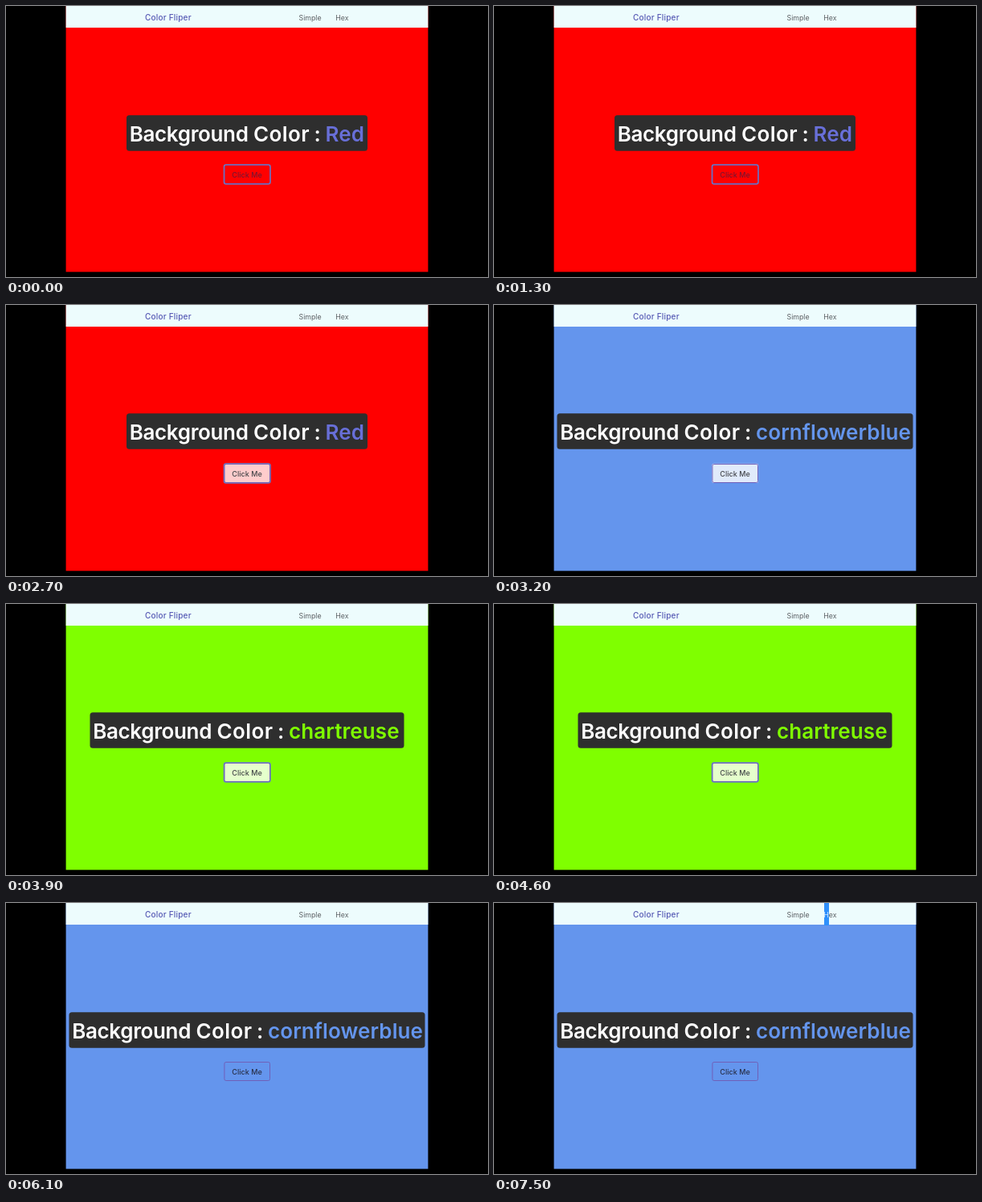
Animation of 600 by 338 pixels, one loop 8 s. Source, as an HTML page:

```html
<!DOCTYPE html>
<html lang="en">
<head>
<meta charset="utf-8">
<title>Color Fliper</title>
<style>
  html, body { margin: 0; width: 100%; height: 100%; overflow: hidden; background: #000; }
  svg { display: block; width: 100%; height: 100%; }
  text { font-family: Inter, "Open Sans", sans-serif; white-space: pre; }
  .title { font-size: 26px; font-weight: 600; fill: #fff; }
  .brand { font-size: 10px; font-weight: 500; letter-spacing: .2px; fill: #5558b4; }
  .nav { font-size: 8.8px; font-weight: 400; fill: #5c6064; }
  .label { font-size: 9px; font-weight: 500; letter-spacing: .05px; }
</style>
</head>
<body>
<svg viewBox="0 0 600 338">
  <defs>
    <clipPath id="wordClip"><rect x="281" y="204" width="24" height="13"/></clipPath>
    <clipPath id="navClip"><rect x="411" y="0" width="6" height="28"/></clipPath>
  </defs>
  <rect width="600" height="338"/>
  <rect id="page" x="74.6" y="0" width="450.8" height="331.6"/>
  <rect x="74.6" y="0" width="450.8" height="27" fill="#edfcfd"/>
  <text class="brand" x="173" y="18">Color Fliper</text>
  <text class="nav" x="364.5" y="17.6">Simple</text>
  <text class="nav" x="410.2" y="17.6">Hex</text>
  <g id="navSel">
    <rect x="411" y="0" width="6" height="28" fill="#2f90fb"/>
    <text class="nav" x="410.2" y="17.6" clip-path="url(#navClip)" style="fill:#d9ecff">Hex</text>
  </g>

  <g id="banner">
    <rect id="box" y="135.3" height="44.5" rx="3.5" fill="#2e2e2e"/>
    <g id="words">
      <text class="title" x="3.7" y="168.2" letter-spacing="-.35">Background</text>
      <text class="title" x="158" y="168.2" letter-spacing=".4">Color</text>
      <text class="title" x="233.4" y="168.2">:</text>
      <text id="name" class="title" x="247.5" y="168.2" letter-spacing=".1"></text>
    </g>
  </g>

  <rect id="fill" x="271.3" y="197.8" width="57.8" height="24.2" rx="2.5" fill="#fff"/>
  <rect id="ring" x="271.4" y="197.9" width="57.6" height="24.2" rx="2.5" fill="none" stroke="#6480cc" stroke-width="1.5"/>
  <rect x="271.9" y="198.5" width="56.6" height="23" rx="2" fill="none" stroke="#7060b8"/>
  <text id="label" class="label" x="281.3" y="213.8">Click Me</text>
  <g id="wordSel">
    <rect x="281" y="204" width="24" height="13" fill="#4f90d8"/>
    <text class="label" x="281.3" y="213.8" clip-path="url(#wordClip)" fill="#eaf4ff">Click Me</text>
  </g>
</svg>
<script>
  const LOOP = 8000;
  const $ = id => document.getElementById(id);
  const set = (id, attrs) => {
    for (const key in attrs) $(id).setAttribute(key, attrs[key]);
  };
  const show = (id, on) => set(id, { visibility: on ? 'visible' : 'hidden' });
  const ramp = (t, from, to) => Math.min(1, Math.max(0, (t - from) / (to - from)));

  // start time, name, page colour, name colour, banner width
  const flips = [
    [0, 'Red', '#ff0000', '#686fd8', 300],
    [2800, 'cornflowerblue', '#6495ed', '#6495ed', 443],
    [3900, 'chartreuse', '#7fff00', '#7fff00', 391],
    [5000, 'Orange', '#ffa500', '#ffa500', 344],
    [5900, 'cornflowerblue', '#6495ed', '#6495ed', 443]
  ];

  function draw(t) {
    const [, name, page, ink, width] = flips.filter(f => f[0] <= t).pop();
    const left = 300 - width / 2;
    set('page', { fill: page });
    set('box', { x: left, width });
    set('words', { transform: `translate(${left} 0)` });
    $('name').textContent = name;
    $('name').style.fill = ink;

    const hover = ramp(t, 1800, 2050) * (1 - ramp(t, 5900, 6080));
    const raised = t >= 1800 && t < 6000;
    set('banner', { transform: `translate(0 ${raised ? 0 : 1})` });
    set('fill', { opacity: hover * 0.8 });
    set('label', { fill: t < 1800 ? '#7c1430' : raised ? '#44464a' : '#28304a' });
    show('ring', page !== '#6495ed');
    show('wordSel', t >= 5050 && t < 5900);
    show('navSel', t >= 7300);
  }

  function tick() {
    draw(performance.now() % LOOP);
    requestAnimationFrame(tick);
  }
  tick();
</script>
</body>
</html>
```
